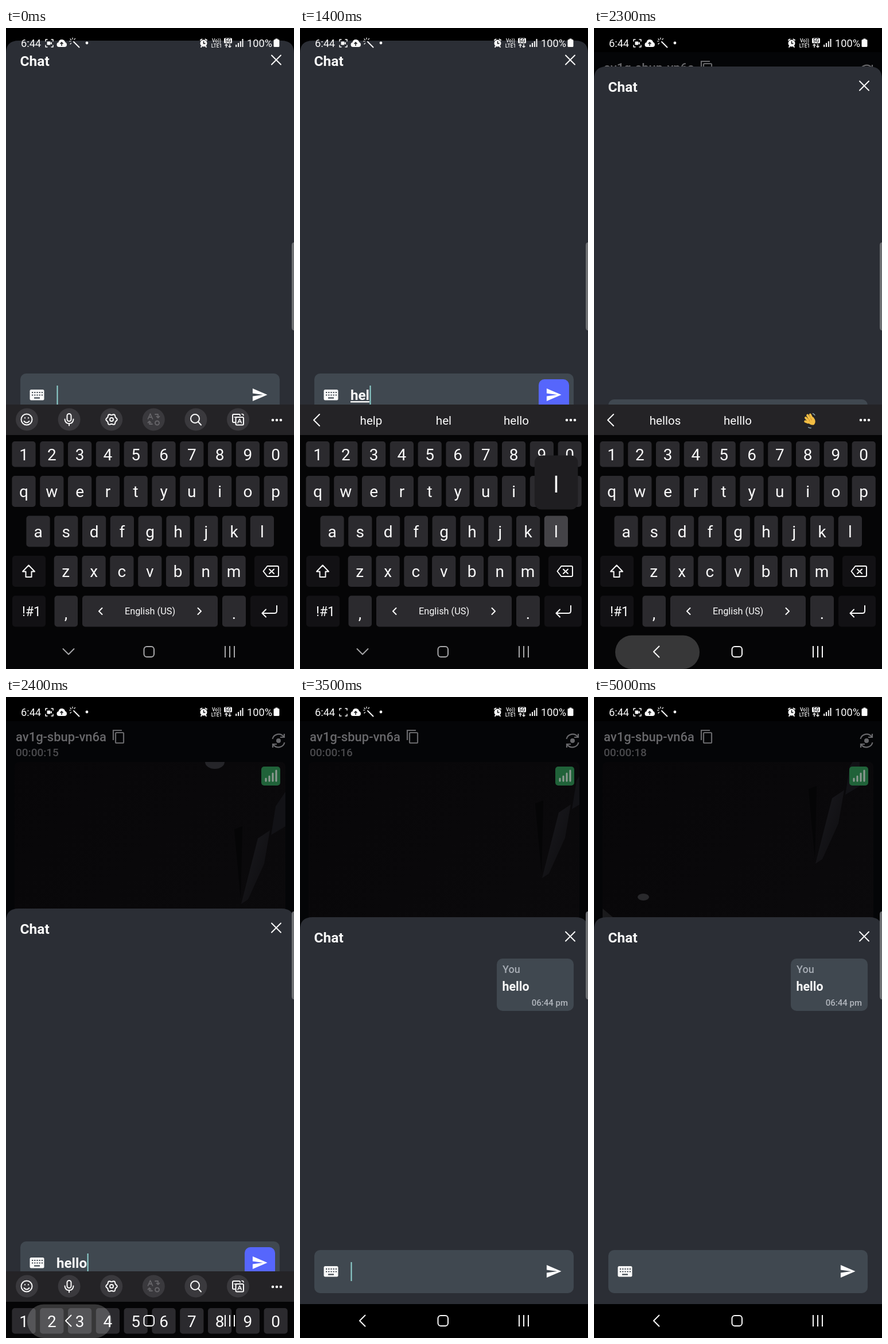
Animation of 502x1115 px, one loop 5.1 s. Source, as an HTML page:

```html
<!DOCTYPE html>
<html lang="en">
<head>
<meta charset="utf-8">
<title>Chat</title>
<style>
  html, body { margin: 0; width: 100%; height: 100%; overflow: hidden; background: #000; }
  svg { display: block; width: 100%; height: 100%; }
  text { font-family: Roboto, "Noto Sans", sans-serif; fill: #fafafa; white-space: pre; }
  .mid { text-anchor: middle; }
  .line { fill: none; stroke: #fafafa; stroke-width: 2; stroke-linecap: round; stroke-linejoin: round; }
  .key { fill: #2b2a2e; }
  .dark { fill: #121114; }
  .down { fill: #444347; }
  .panel { fill: #404850; }
  .bold { font-weight: 700; }
  .semi { font-weight: 500; }
</style>
</head>
<body>
<svg viewBox="0 0 502 1115" preserveAspectRatio="none">
  <defs>
    <clipPath id="videoClip"><rect x="15" y="113" width="472" height="500" rx="8"/></clipPath>
    <clipPath id="screenClip"><rect width="502" height="1056"/></clipPath>
    <linearGradient id="videoFill" x1="0" y1="0" x2="1" y2="1">
      <stop offset="0" stop-color="#070608"/>
      <stop offset="1" stop-color="#0c0b0d"/>
    </linearGradient>
    <linearGradient id="beam" x1="0" y1="0" x2="1" y2="1">
      <stop offset="0" stop-color="#1b1b20"/>
      <stop offset="1" stop-color="#0c0b0d"/>
    </linearGradient>
  </defs>

  <!-- call screen, dimmed -->
  <rect width="502" height="1115" fill="#000"/>
  <rect y="42" width="502" height="1014" fill="#040507"/>
  <g clip-path="url(#videoClip)">
    <rect x="15" y="113" width="472" height="500" fill="url(#videoFill)"/>
    <g id="scene">
      <path d="M410 360L439 246L460 232L450 290L422 352Z" fill="url(#beam)"/>
      <path d="M398 230L412 225L409 350Z" fill="#050506"/>
      <path d="M470 190L487 165V225L462 240Z" fill="#121216"/>
    </g>
    <ellipse id="lampTop" cx="364" cy="113" rx="17" ry="12" fill="#252529"/>
    <g id="lampLow">
      <ellipse cx="86" cy="348" rx="10" ry="6" fill="#29292c"/>
      <path d="M15 368L34 384H15Z" fill="#1a1a1c"/>
    </g>
  </g>
  <text x="17" y="77" font-size="22" class="semi" style="fill:#68686b">av1g-sbup-vn6a</text>
  <text id="timer" x="17" y="103" font-size="19" class="semi" style="fill:#4a4a4d"></text>
  <g fill="none" stroke="#68686b" stroke-width="2.2">
    <path d="M187 75V58H202"/>
    <rect x="191" y="62" width="14" height="18" rx="1.5"/>
    <path d="M464.500 73A11 11 0 0 1 484 69M485.500 79A11 11 0 0 1 466 83M485 64V70H478M465 88V82H472"/>
  </g>
  <circle cx="475" cy="76" r="4" fill="#68686b"/>
  <rect x="445" y="121" width="33" height="33" rx="5" fill="#206239"/>
  <path d="M453 146V142M459 146V138M465 146V133M471 146V128" stroke="#8d9a92" stroke-width="3" stroke-linecap="round"/>

  <!-- chat sheet -->
  <g clip-path="url(#screenClip)">
    <g id="sheet">
      <path d="M0 1100V22Q0 0 22 0H480Q502 0 502 22V1100Z" fill="#2b2e35"/>
      <text x="24.500" y="44" font-size="24.500" class="bold">Chat</text>
      <path class="line" stroke-width="2.400" d="M463 25.500L479 41.500M479 25.500L463 41.500"/>
      <g data-on="3100-5100">
        <rect class="panel" x="343" y="72" width="134" height="91" rx="10"/>
        <text x="353" y="97" font-size="18" class="semi" style="fill:#a5abb3">You</text>
        <text x="352.500" y="128" font-size="21.400" class="bold">hello</text>
        <text x="467" y="154" font-size="15" text-anchor="end" class="semi" style="fill:#b2b7be">06:44 pm</text>
      </g>
      <rect class="panel" x="25" y="579" width="452" height="75" rx="10"/>
      <rect x="41.500" y="607" width="25" height="18.500" rx="2.500" fill="#fafafa"/>
      <path d="M45 612H64M45 616.500H64" stroke="#404850" stroke-width="2.200" stroke-dasharray="2.200 2"/>
      <path d="M49 621.500H59" stroke="#404850" stroke-width="2.200"/>
      <text id="draft" x="88" y="625" font-size="24.200" class="bold"></text>
      <rect id="cursor" data-on="0-300 600-2800 3100-3600 4100-4600" y="600" width="2" height="33" fill="#8fd3d0"/>
      <rect data-on="600-3100" x="416" y="589" width="53" height="54" rx="10" fill="#5666fc"/>
      <path transform="translate(427.500 601.400) scale(1.220)" d="M2 21L23 12L2 3V10L17 12L2 14Z" fill="#fff"/>
    </g>
  </g>

  <!-- keyboard -->
  <g data-on="0-2500">
    <g id="keyboard">
      <rect y="655" width="502" height="460" fill="#050506"/>
      <rect y="655" width="502" height="53" fill="#242326"/>
      <g data-on="0-800 2400-2500" id="tools">
        <g id="discs" fill="#3a393d"></g>
        <g class="line">
          <circle cx="36" cy="681" r="9.500"/>
          <path d="M31.500 684Q36 689 40.500 684M33 678V678.500M39 678V678.500"/>
          <rect x="106.500" y="671" width="7" height="13" rx="3.500"/>
          <path d="M102.500 680.500Q103 688 110 688T117.500 680.500M110 688V691.500"/>
          <path id="gear"/>
          <circle cx="184" cy="681" r="3"/>
          <circle cx="329.500" cy="679.500" r="7.500"/>
          <path d="M335 685L340 690.500"/>
          <path d="M399 686H397Q395 686 395 684V674Q395 672 397 672H406Q408 672 408 674"/>
          <rect x="400.500" y="677" width="13.500" height="13.500" rx="2"/>
          <path stroke-width="1.600" d="M404 687L407.300 680L410.500 687M405 685H409.500M398 677H402M411 671.500Q414 671.500 414 674"/>
        </g>
        <g class="line" style="stroke:#656468">
          <path stroke-width="1.800" d="M247.500 680L251.500 671L255.500 680M249 677H254M260 672H265V678M262.500 675.500L265 678L267.500 675.500M255 689H250V684M247.500 686.500L250 684L252.500 686.500"/>
          <circle cx="263.500" cy="687" r="3.500"/>
        </g>
      </g>
      <g data-on="800-2400">
        <path class="line" d="M34 672L24 682L34 692"/>
        <g id="hints" font-size="20.600"></g>
        <g data-on="1900-2400" transform="translate(378 683) rotate(-32)">
          <path d="M-4 -3L-5 -9M0 -4L0 -11M4 -3L4.500 -9.500M-6 0L-9 -4" stroke="#f3bd43" stroke-width="4" stroke-linecap="round"/>
          <path d="M-7 -3Q0 -7 7 -3Q8 7 1 9Q-5 8 -7 -3Z" fill="#f3bd43"/>
          <path d="M-1.500 -4L-2.500 0M2 -4L1.500 0" stroke="#c88a2c" stroke-width="1"/>
          <path d="M9 -9Q11 -7 11 -4M-10 7Q-9 10 -6 11" fill="none" stroke="#8aa3ad" stroke-width="1.500"/>
        </g>
        <text data-on="1900-2000" x="390" y="690" font-size="20.600" style="fill:#d0d0d2">lo</text>
      </g>
      <path d="M465 682h.01M472 682h.01M479 682h.01" class="line" style="stroke-width:4.600"/>
      <g id="keys"></g>
      <g class="line">
        <path d="M39.500 934.500L50 945.500H44.500V955H34.500V945.500H29Z"/>
        <path d="M455.500 936H473Q475 936 475 938V952Q475 954 473 954H455.500L448.500 945Z"/>
        <path d="M459 941.500L467 949M467 941.500L459 949"/>
        <path d="M472 1005V1014Q472 1018 468 1018H447M453 1011.500L446.500 1018L453 1024.500"/>
        <path d="M167.500 1009L162 1014.500L167.500 1020M334.500 1009L340 1014.500L334.500 1020"/>
      </g>
      <g id="popup">
        <rect x="-37.500" y="-105" width="75.500" height="94" rx="12" fill="#1f1e21"/>
        <text y="-41" font-size="39" class="mid"></text>
      </g>
    </g>
  </g>

  <!-- navigation bar -->
  <rect id="ripple" x="37" y="1056.500" width="147" height="58.500" rx="29" fill="#fff" data-on="2200-2600"/>
  <path data-on="0-2300" class="line" style="stroke:#a8a8aa" d="M99.500 1080L109 1089.500L118.500 1080"/>
  <path data-on="2300-5100" class="line" d="M113.500 1075.500L104 1085L113.500 1094.500"/>
  <g id="nav" class="line" style="stroke-linecap:butt">
    <rect x="240.500" y="1076" width="17.500" height="18" rx="5"/>
    <path d="M382 1075V1095M390 1075V1095M398 1075V1095"/>
  </g>

  <!-- status bar -->
  <text x="26" y="32.500" font-size="18.200">6:44</text>
  <text x="420" y="32.500" font-size="18.200">100%</text>
  <path class="line" style="stroke-width:1.500" d="M69 23V20H72M79 20H82V23M82 30V33H79M72 33H69V30"/>
  <g data-blink fill="#fafafa">
    <rect x="71.500" y="23.500" width="6" height="6" rx="1"/>
    <path d="M77 26.500L80 24V29Z"/>
  </g>
  <path d="M92.500 33Q88.500 33 88.500 29Q88.500 25.500 91.500 25Q92.500 20 97 20Q102 20 103 24.500Q106 25.500 106 29Q106 33 102 33Z" fill="#fafafa"/>
  <path d="M97 31V25M94.500 27.500L97 25L99.500 27.500" fill="none" stroke="#17181b" stroke-width="1.500"/>
  <path class="line" d="M118 24L127.500 33.500"/>
  <path class="line" style="stroke-width:1.200" d="M116 17V19.500M110.500 23H113M112 19L113.500 20.500M120.500 18.500L119 20M112 28L113.500 26.500"/>
  <circle cx="141" cy="26" r="2.400" fill="#fafafa"/>
  <circle cx="344.500" cy="26.500" r="6" fill="#fafafa"/>
  <path class="line" d="M339 21L341.500 19.500M350 21L347.500 19.500M341 32L340 33M348 32L349 33"/>
  <path d="M344.500 23V27H347.500" fill="none" stroke="#17181b" stroke-width="1.500"/>
  <g class="mid" font-size="8.500" font-weight="500">
    <text x="367" y="24.500">Vo))</text>
    <text x="367" y="34">LTE1</text>
    <rect x="380" y="17.500" width="14" height="9" rx="1.500" fill="#fafafa"/>
    <text x="387" y="25" font-size="8.500" style="fill:#17181b">5G</text>
  </g>
  <path class="line" style="stroke-width:1.500" d="M384 33.500V28.500M382 30L384 28.500L386 30M390 28.500V33.500M388 32L390 33.500L392 32"/>
  <path d="M401.200 33V29M405 33V26M408.800 33V23M412.500 33V19" stroke="#fafafa" stroke-width="2"/>
  <path d="M469.500 20V18.500H473.500V20H475Q476.500 20 476.500 21.500V31.500Q476.500 33 475 33H468Q466.500 33 466.500 31.500V21.500Q466.500 20 468 20Z" fill="#fafafa"/>
  <path d="M502 373Q498 373 498 378V521Q498 526 502 526Z" fill="#6e7073"/>
</svg>
<script>
const LOOP = 5100, STEP = 100;
const $ = id => document.getElementById(id);

// Keyboard layout
const keyAt = {};
const keyRect = (x, y, w, h, cls) =>
  `<rect class="${cls}" x="${x}" y="${y}" width="${w}" height="${h}" rx="5"/>`;
const label = (x, y, size, s) => `<text class="mid" x="${x}" y="${y}" font-size="${size}">${s}</text>`;

function keyRow(chars, x0, y, h, base) {
  return [...chars].map((c, i) => {
    const x = x0 + i * 48.8;
    keyAt[c] = { x, y };
    return keyRect(x - 20.6, y, 41.2, h, "key").replace("<rect", `<rect id="key-${c}"`) + label(x, base, 28, c);
  }).join("");
}

$("keys").innerHTML =
  keyRow("1234567890", 31, 719, 44.5, 752) +
  keyRow("qwertyuiop", 31, 779, 54, 816) +
  keyRow("asdfghjkl", 56, 848.5, 54, 885.5) +
  keyRow("zxcvbnm", 104.3, 918, 54, 955) +
  keyRect(11, 918, 58, 54, "dark") + keyRect(433, 918, 58, 54, "dark") +
  keyRect(11, 987.5, 58, 54, "dark") + keyRect(426, 987.5, 65, 54, "dark") +
  keyRect(84.5, 987.5, 40.5, 54, "key") + keyRect(133, 987.5, 236, 54, "key") +
  keyRect(377, 987.5, 41, 54, "key") +
  label(44.5, 1022.5, 23, "!#1") + label(104.5, 1028, 28, ",") +
  label(397.5, 1028, 28, ".") + label(251, 1020, 16.3, "English (US)");

$("discs").innerHTML = [0, 1, 2, 3, 4, 5]
  .map(i => `<circle cx="${36.5 + i * 73.6}" cy="681" r="19.5"/>`).join("");

$("gear").setAttribute("d", "M" + Array.from({ length: 48 }, (_, i) => {
  const a = i * Math.PI / 24, r = 8.8 + Math.cos(a * 6 + Math.PI);
  return (184 + r * Math.sin(a)).toFixed(1) + " " + (681 - r * Math.cos(a)).toFixed(1);
}).join("L") + "Z");

// Typing
const WORD = "hello", PRESS = [500, 800, 1100, 1400, 1600];
const HINT_LAG = 200, SENT = 3100;
const HINTS = [[], ["he", "ha", "hi"], ["hey", "he", "her"], ["help", "hel", "hello"],
  ["hells", "hell", "hello"], ["hellos", "helllo", ""]];
const typedAt = t => PRESS.filter(p => t >= p + STEP).length;

function drawHints(t) {
  const n = typedAt(t - HINT_LAG);
  const fresh = n === 1 && t < PRESS[0] + STEP + HINT_LAG + STEP;
  $("hints").innerHTML = HINTS[n].map((s, i) => label(124 + i * 126.5, 690, 20.6,
    fresh ? `${s[0]}<tspan fill-opacity=".45">${s.slice(1)}</tspan>` : s)).join("");
}

function drawTyping(t) {
  const draft = $("draft");
  draft.textContent = t < SENT ? WORD.slice(0, typedAt(t)) : "";
  draft.style.textDecoration = t < 2300 ? "underline" : "none";
  const w = draft.textContent ? draft.getComputedTextLength() : 0;
  $("cursor").setAttribute("x", 88.5 + w);

  const i = PRESS.findIndex(p => t >= p && t < p + STEP);
  for (const c of WORD) $("key-" + c).setAttribute("class", c === WORD[i] ? "down" : "key");
  const popup = $("popup");
  popup.style.display = i < 0 ? "none" : "";
  if (i >= 0) {
    const k = keyAt[WORD[i]];
    popup.setAttribute("transform", `translate(${k.x} ${k.y})`);
    popup.querySelector("text").textContent = WORD[i];
  }
}

// Motion
const held = (t, ...stops) => stops.reduce((v, [at, x]) => t >= at ? x : v, 0);
const ramp = (t, a, b) => Math.min(1, Math.max(0, (t - a) / (b - a)));
const move = (id, x, y) => $(id).setAttribute("transform", `translate(${x} ${y})`);

const timed = [...document.querySelectorAll("[data-on]")].map(el => ({
  el, spans: el.dataset.on.split(" ").map(s => s.split("-").map(Number))
}));
const blink = document.querySelector("[data-blink]");

function draw(t) {
  for (const { el, spans } of timed)
    el.style.display = spans.some(([a, b]) => t >= a && t < b) ? "" : "none";
  blink.style.display = t % 1000 < 500 ? "" : "none";

  move("sheet", 0, held(t, [0, 22], [2300, 67], [2400, 368], [2500, 383]));
  move("keyboard", 0, held(t, [2400, 344]));
  $("ripple").setAttribute("fill-opacity", held(t, [2200, .1], [2300, .2], [2500, .1]));
  $("nav").style.stroke = t < 2300 ? "#a8a8aa" : "#fafafa";

  $("timer").textContent = "00:00:" + (15 + Math.max(0, Math.floor((t - 1700) / 1000)));
  const a = ramp(t, 2400, 3500), b = ramp(t, 3500, 5000);
  move("scene", 12 * a - 36 * b, -45 * a - 25 * b);
  $("lampTop").setAttribute("opacity", 1 - ramp(t, 2400, 2900));
  $("lampLow").setAttribute("opacity", ramp(t, 4200, 5000));

  drawTyping(t);
  drawHints(t);
}

let last = -1;
function tick() {
  const t = Math.floor(performance.now() % LOOP / STEP) * STEP;
  if (t !== last) draw(last = t);
  requestAnimationFrame(tick);
}
tick();
</script>
</body>
</html>
```
